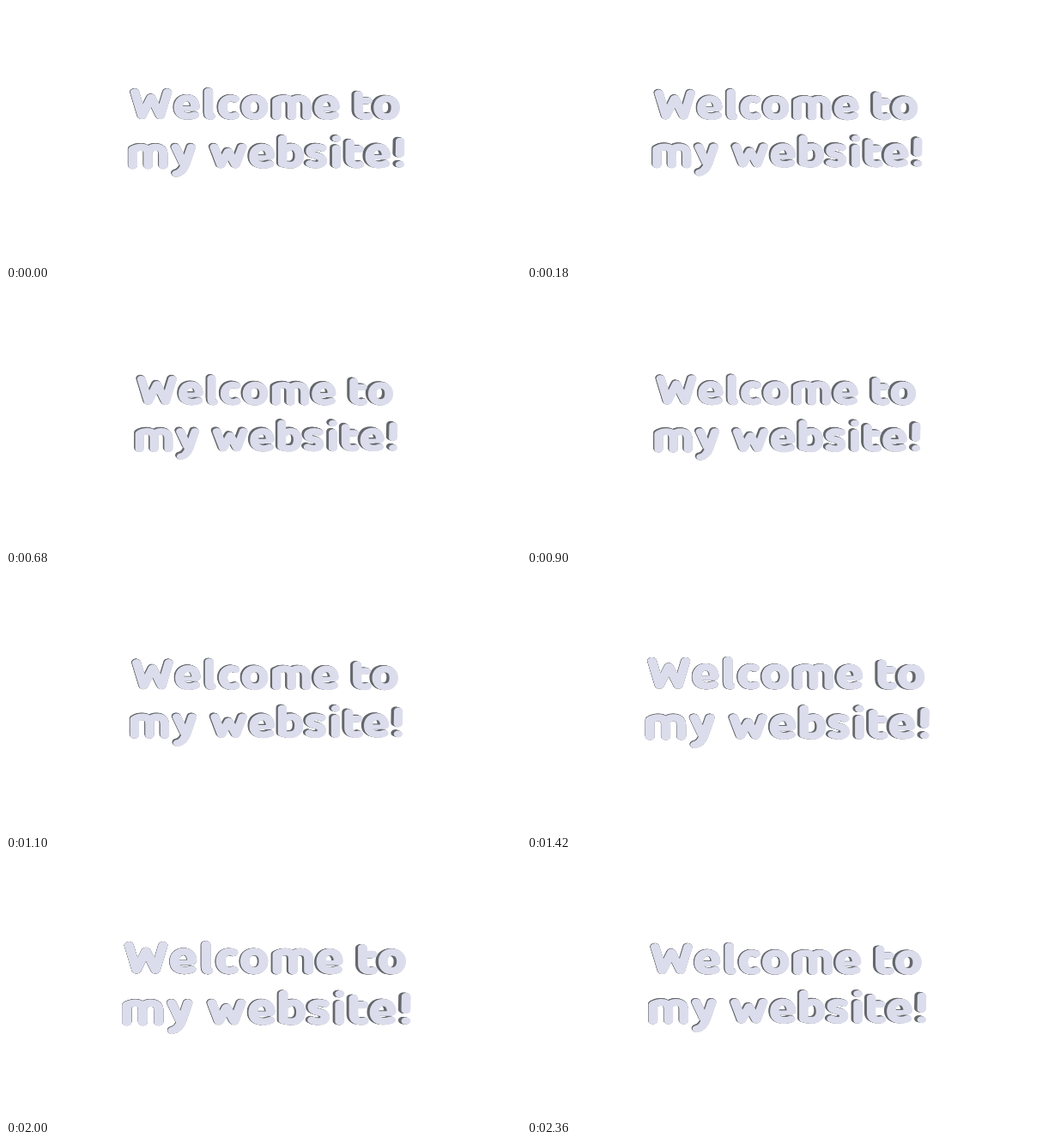
An HTML page with a canvas for the animation above (2.38 s loop, 600x300 px).

```html
<!DOCTYPE html>
<html lang="en">
<head>
<meta charset="utf-8">
<title>Welcome</title>
<style>
  html, body { margin: 0; width: 100%; height: 100%; overflow: hidden; background: #fff; }
  canvas { display: block; width: 600px; height: 300px; }
</style>
</head>
<body>
<canvas id="stage" width="600" height="300" role="img" aria-label="Welcome to my website!">Welcome to my website!</canvas>
<script>
const ctx = document.getElementById('stage').getContext('2d');
const LOOP = 2380, STEP = 20, SWING = 2400;
const CENTER = { x: 303, y: 147 };
const FACE = '#dcddec', SIDE = '#65686c';
const PEN = 8, STRETCH = 1.3; // the pen is wider than it is tall
const LAYERS = 5;

// Centre lines of the rounded letters, baseline at y = 0.
const outlines = {
  W: 'M5.7-32.3L14-5 24.5-26 35-5 43.3-32.3',
  e: 'M25.2-15C25.2-21.5 21.5-25.6 16-25.6C9.5-25.6 5.7-21 5.7-14.5C5.7-7.8 10-4.4 17-4.4C20.5-4.4 22.5-5 24.5-5.9',
  l: 'M5.7-33.5V-9C5.7-5.6 6.8-4.4 8.3-4.4',
  c: 'M20-24.6C18.5-25.3 17-25.6 15.8-25.6C9.5-25.6 5.7-21 5.7-15C5.7-8.5 9.5-4.4 15.8-4.4C17.5-4.4 19-4.8 20.2-5.4',
  o: 'M16-25.6C22.5-25.6 26.3-21 26.3-15S22.5-4.4 16-4.4 5.7-9 5.7-15 9.5-25.6 16-25.6Z',
  m: 'M5.7-4.4V-23C9-25 12-25.6 15-25.6C20.5-25.6 23.3-23 23.3-18V-4.4M23.3-22C26-24.6 29-25.6 32-25.6C38-25.6 40.8-22.5 40.8-17V-4.4',
  t: 'M6-30.5V-12C6-6.8 9.5-4.4 14.5-4.4C16-4.4 17-4.6 17.8-4.9M6-23H17.3',
  y: 'M5.7-25.6L14.5-7M23.7-25.6L17-6C14 2 10.5 4.3 6.5 5',
  w: 'M5.7-25.6L13.5-5 22-20.5 30.5-5 38.3-25.6',
  b: 'M5.7-35.5V-6C9-4.8 12-4.4 15-4.4C21.5-4.4 25.3-9 25.3-15C25.3-21.5 22-25.6 17-25.6C12.5-25.6 9-23.8 5.7-21',
  s: 'M20-24.3C18-25.2 16-25.6 13.5-25.6C8.5-25.6 6-23.5 6-20.8C6-13 20.3-17.5 20.3-9.5C20.3-6 17.5-4.4 13-4.4C10-4.4 7.5-5 5.7-6.1',
  i: 'M6-24V-4.4M6-35.3h.1',
  '!': 'M6.3-32.5L6-17M6-4.8h.1'
};
const bars = { e: 'M8-13.4H24' };

const lines = [
  { text: 'Welcometo', y: 133.4, xs: [144.6, 195.3, 230.5, 246.7, 273.8, 309.7, 358.5, 404.5, 427.5] },
  { text: 'mywebsite!', y: 190.2, xs: [142.3, 192.2, 237, 282.8, 316.5, 348.5, 379, 394.5, 417.8, 452.7] }
];

function penPath(d) {
  const p = new Path2D();
  p.addPath(new Path2D(d), new DOMMatrix([1 / STRETCH, 0, 0, 1, 0, 0]));
  return p;
}

const letters = lines.flatMap(({ text, y, xs }) => [...text].map((ch, i) => ({
  x: xs[i] - CENTER.x,
  y: y - CENTER.y,
  stem: penPath(outlines[ch]),
  bar: bars[ch] && penPath(bars[ch])
})));

function drawLayer(color, zoom, dx, dy) {
  ctx.strokeStyle = color;
  for (const { x, y, stem, bar } of letters) {
    const s = zoom * (1 - x * 0.00008); // slight turn: the left side is nearer
    ctx.setTransform(s * STRETCH, 0, 0, s, CENTER.x + zoom * x + dx, CENTER.y + s * y + dy);
    ctx.lineWidth = PEN;
    ctx.stroke(stem);
    if (bar) {
      ctx.lineWidth = PEN * 0.66;
      ctx.stroke(bar);
    }
  }
}

function draw(now) {
  const t = Math.floor((now % LOOP) / STEP) * STEP;
  const swing = Math.sin(2 * Math.PI * t / SWING);
  const zoom = 1.002 - 0.052 * swing;
  const shrink = 0.009 - 0.003 * swing;
  const dx = -2.1 - 0.3 * swing, dy = -0.8 - 0.6 * swing;

  ctx.setTransform(1, 0, 0, 1, 0, 0);
  ctx.fillStyle = '#fff';
  ctx.fillRect(0, 0, 600, 300);
  ctx.lineCap = ctx.lineJoin = 'round';
  for (let i = LAYERS; i > 0; i--) {
    const d = i / LAYERS;
    drawLayer(SIDE, zoom * (1 - shrink * d), dx * d, dy * d);
  }
  drawLayer(FACE, zoom, 0, 0);
}

const start = performance.now();
function tick() {
  draw(performance.now() - start);
  requestAnimationFrame(tick);
}
tick();
</script>
</body>
</html>
```
